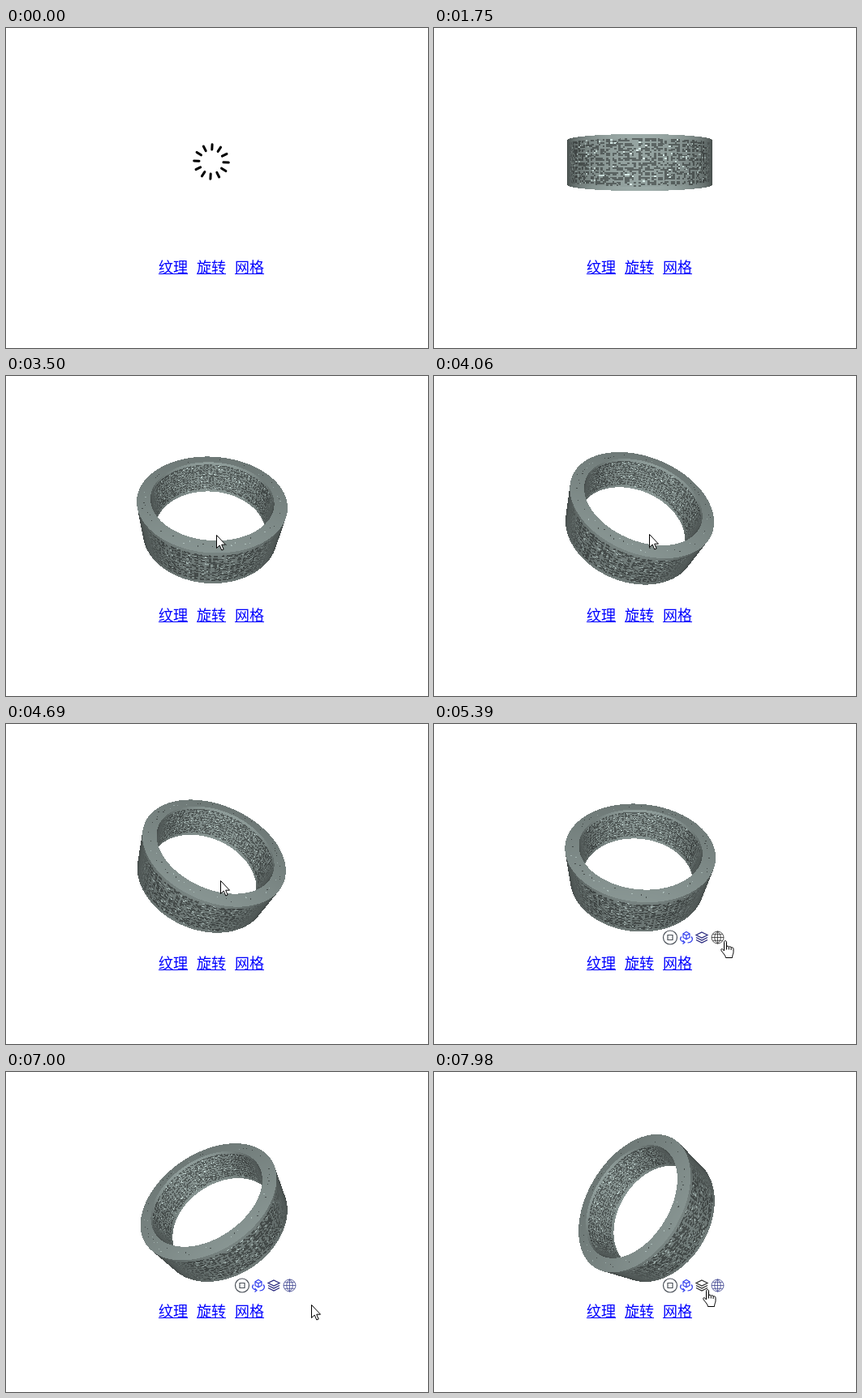
An HTML page with a canvas that plays this animation: 520x395 px, repeating every 8000 ms.

```html
<!DOCTYPE html>
<html lang="zh">
<head>
<meta charset="utf-8">
<title>Ring viewer</title>
<style>
html, body { margin: 0; width: 100%; height: 100%; overflow: hidden; background: #fff; }
canvas { position: absolute; left: 0; top: 0; }
span {
  position: absolute; top: 284px; width: 36px; height: 19px;
  font: 300 18px/21px "Noto Sans CJK SC", "Noto Sans CJK", sans-serif;
  color: #00f; border-bottom: 1px solid #00f; white-space: nowrap;
}
</style>
</head>
<body>
<span style="left:188px">纹理</span>
<span style="left:235px">旋转</span>
<span style="left:282px">网格</span>
<canvas id="stage" width="520" height="395"></canvas>
<script>
const ctx = document.getElementById('stage').getContext('2d');
const LOOP = 8000, START = 1190, STEP = 70;
const CX = 253.5, CY = 166;

// Ring size and camera distance, in pixels at the ring's centre
const OUTER = 85.9, INNER = 71, HALF = 25.4, CAM = 310;
const ROWS = 30, COLS = 270, BAND = 21.5;
const VIEW = { x: 154, y: 70, w: 200, h: 196 };
const image = ctx.createImageData(VIEW.w, VIEW.h);

// [time, roll, tilt] in ms and degrees
const POSE = [
  [2660, 0, 0], [2800, 0, 3], [3290, -2, 47], [3500, 4, 42],
  [3920, 20, 42], [4410, 30, 42], [4690, 24, 42], [6020, -10, 43.5], [7980, -59, 41]
];
// [time, left, top] of the pointer
const POINTER = [
  [2240, 333, 381], [2310, 312, 332], [2380, 291, 266], [2450, 283, 232],
  [2520, 276, 195], [2590, 274, 189], [2800, 272, 186], [3290, 260, 200],
  [3500, 259, 196], [4410, 268, 194], [4690, 264, 193], [4830, 270, 200],
  [5180, 350, 264], [5320, 354, 267], [6020, 348, 266], [6230, 350, 267],
  [6650, 377, 286], [7280, 375, 287], [7700, 360, 280], [7840, 342, 274], [7980, 331, 268]
];

function track(keys, t) {
  if (t <= keys[0][0]) return keys[0].slice(1);
  for (let i = 1; i < keys.length; i++) {
    const a = keys[i - 1], b = keys[i];
    if (t <= b[0]) {
      const k = (t - a[0]) / (b[0] - a[0]);
      return [a[1] + (b[1] - a[1]) * k, a[2] + (b[2] - a[2]) * k];
    }
  }
  return keys[keys.length - 1].slice(1);
}

function hash(a, b) {
  const s = Math.sin(a * 127.1 + b * 311.7) * 43758.5453;
  return s - Math.floor(s);
}

// Perforated wall: rough pits between the bars of a fine lattice
function wallTone(angle, v) {
  if (Math.abs(v) > BAND) return 1;
  const i = Math.floor((angle / (2 * Math.PI) + 4) * COLS) % COLS;
  const j = Math.floor((v / (2 * BAND) + 0.5) * ROWS);
  const h = hash(i, j);
  if (h > 0.965) return 1.4;
  const bar = i % 3 === 0 || j % 3 === 0;
  return h < (bar ? 0.22 : 0.72) ? 0.6 : 0.96;
}

// Sparse pits along the flat rim
function rimTone(angle, rho) {
  const col = (angle / (2 * Math.PI) + 4) * 110;
  const i = Math.floor(col) % 110, h = hash(i, 3);
  const mid = (OUTER + INNER) / 2 + (hash(i, 8) - 0.5) * 6;
  if (h < 0.55 || Math.abs(rho - mid) > 0.6 || Math.abs(col % 1 - 0.5) > 0.13) return 1;
  return h > 0.85 ? 1.3 : 0.55;
}

function drawRing(t) {
  const [roll, tilt] = track(POSE, t).map(d => d * Math.PI / 180);
  const a = Math.sin(tilt), c = Math.cos(tilt), sr = Math.sin(roll), cr = Math.cos(roll);
  const spin = (t - START) / 1000 * 0.44;
  const o2 = CAM * c, ou = CAM * a;
  const px = image.data;
  let k = 0;
  for (let j = 0; j < VIEW.h; j++) {
    for (let i = 0; i < VIEW.w; i++, k += 4) {
      const X = VIEW.x + i + 0.5 - CX, Y = CY - (VIEW.y + j + 0.5);
      const d1 = X * cr - Y * sr;
      const d2 = -a * (X * sr + Y * cr) - CAM * c;
      const du = c * (X * sr + Y * cr) - CAM * a;
      const qa = d1 * d1 + d2 * d2, qb = o2 * d2;
      let best = Infinity, kind = 0;

      const wall = (radius, side) => {
        const disc = qb * qb - qa * (o2 * o2 - radius * radius);
        if (disc < 0) return;
        const s = (-qb + side * Math.sqrt(disc)) / qa;
        if (s < best && Math.abs(ou + s * du) <= HALF) { best = s; kind = -side; }
      };
      wall(OUTER, -1);
      wall(INNER, 1);
      if (ou > HALF) {
        const s = (HALF - ou) / du;
        const rho = Math.hypot(s * d1, o2 + s * d2);
        if (s < best && rho >= INNER && rho <= OUTER) { best = s; kind = 2; }
      }

      let r = 255, g = 255, b = 255;
      if (kind) {
        const p1 = best * d1, p2 = o2 + best * d2, rho = Math.hypot(p1, p2);
        const angle = Math.atan2(p1, p2) + spin;
        const len = Math.hypot(X, Y, CAM);
        const facing = kind === 2 ? -du / len : -kind * (p1 * d1 + p2 * d2) / (rho * len);
        const tone = kind === 2 ? rimTone(angle, rho) : wallTone(angle, ou + best * du);
        const depth = Math.min(1, Math.max(0, facing * 4 - 0.8));
        const light = (0.4 + 0.6 * Math.max(0, facing)) * (1 + (tone - 1) * depth);
        r = 156 * light; g = 171 * light; b = 168 * light;
      }
      px[k] = r; px[k + 1] = g; px[k + 2] = b; px[k + 3] = kind ? 255 : 0;
    }
  }
  ctx.putImageData(image, VIEW.x, VIEW.y);
}

function drawSpinner() {
  ctx.save();
  ctx.translate(253, 165);
  ctx.rotate(Math.PI / 60);
  ctx.lineWidth = 3;
  ctx.lineCap = 'round';
  ctx.strokeStyle = '#000';
  for (let i = 0; i < 12; i++) {
    ctx.beginPath();
    ctx.moveTo(0, -15);
    ctx.lineTo(0, -21.3);
    ctx.stroke();
    ctx.rotate(Math.PI / 6);
  }
  ctx.restore();
}

const ICONS = [
  { x: 291, color: '#4a5058', path: 'M8.5 0A8.5 8.5 0 1 1 -8.5 0A8.5 8.5 0 1 1 8.5 0ZM-3 -3H3V3H-3Z' },
  { x: 311, color: '#3340ee', path: 'M0 -7L4 -4.7V0L0 2.3L-4 0V-4.7ZM-4 -4.7L0 -2.4L4 -4.7M0 -2.4V2.3M-6 -1C-9 2 -7 5 -2 6M-4.5 3.5L-2 6L-4.5 8M6 -1C9 2 7 6 1.5 6.5' },
  { x: 330, color: '#25257c', path: 'M0 -6.5L7 -3L0 .5L-7 -3ZM-7 0L0 3.5L7 0M-7 3L0 6.5L7 3' },
  { x: 349.5, color: '#3c428e', path: 'M7.5 0A7.5 7.5 0 1 1 -7.5 0A7.5 7.5 0 1 1 7.5 0ZM0 -7.5V7.5M-7.5 0H7.5M-6.3 -3.8H6.3M-6.3 3.8H6.3M0 -7.5C-5 -4 -5 4 0 7.5C5 4 5 -4 0 -7.5' }
].map(icon => ({ ...icon, path: new Path2D(icon.path) }));

function drawIcons(tipX) {
  ICONS.forEach((icon, i) => {
    ctx.save();
    ctx.translate(icon.x, 263.5);
    ctx.lineWidth = i === 3 ? 0.8 : 1.2;
    ctx.strokeStyle = Math.abs(tipX - icon.x) < 11 ? '#2c2c2c' : icon.color;
    ctx.stroke(icon.path);
    ctx.restore();
  });
}

const ARROW = new Path2D('M.5 .5V16.5L4.2 13L6.8 19L9.2 18L6.7 12.2H11.5Z');
const HAND = new Path2D('M4.5 13V2.2C4.5 .1 7.5 .1 7.5 2.2V8C7.8 6.6 10.2 6.8 10.3 8.4C10.8 7.2 13 7.5 13.1 9.2C13.8 8.3 16 8.8 16 10.7V14.5C16 17 14.5 18 14.5 21.5H6.5C6.5 18.5 2.5 15.5 1 12.5C0 10.2 2.5 9.8 4.5 13M7.5 8V11.5M10.3 8.4V11.5M13.1 9.2V12');

function drawPointer(x, y, hand) {
  const shape = hand ? HAND : ARROW;
  ctx.save();
  ctx.translate(Math.round(x), Math.round(y));
  ctx.fillStyle = '#fff';
  ctx.strokeStyle = '#000';
  ctx.lineWidth = 1;
  ctx.fill(shape);
  ctx.stroke(shape);
  ctx.restore();
}

function draw(now) {
  const time = now % LOOP;
  ctx.clearRect(0, 0, 520, 395);
  if (time < 990) drawSpinner();
  if (time >= START) {
    const t = START + Math.floor((time - START) / STEP) * STEP;
    const hand = (t >= 5110 && t < 6300) || t >= 7770;
    const [x, y] = track(POINTER, t);
    drawRing(t);
    if (t >= 4970) drawIcons(hand ? x + 6 : -99);
    if (t >= 2240) drawPointer(x, y, hand);
  }
}

const begin = performance.now();
function frame() {
  draw(performance.now() - begin);
  requestAnimationFrame(frame);
}
frame();
</script>
</body>
</html>
```
